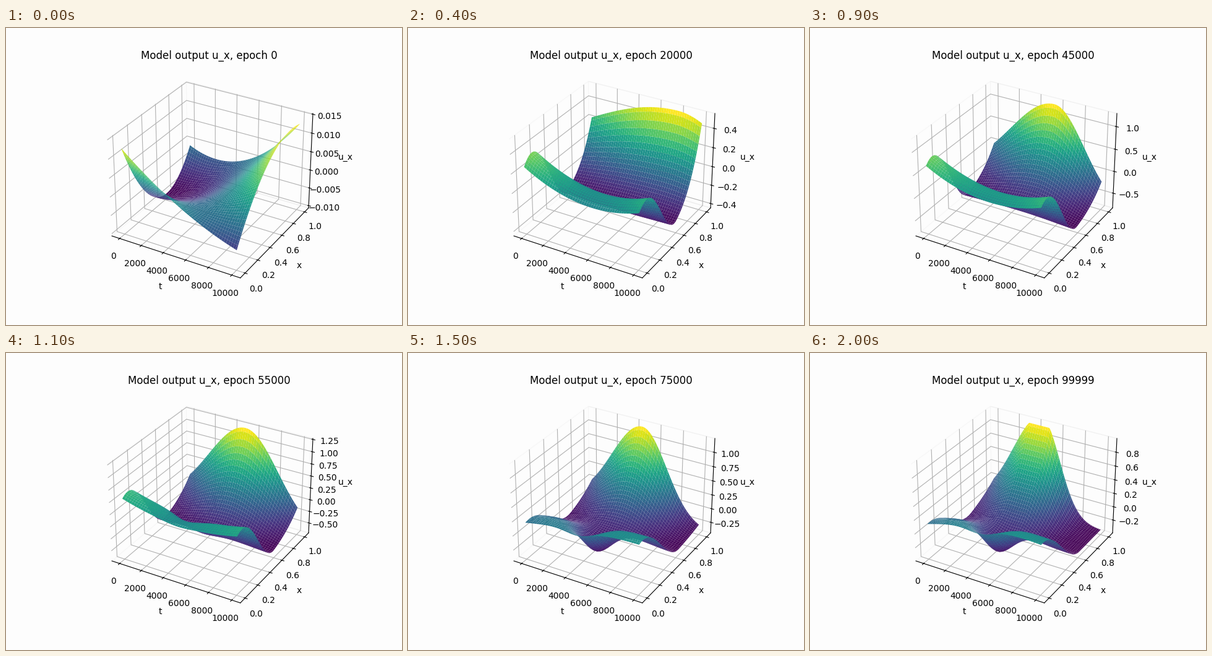
Write a matplotlib script that moves like this. It is 640 by 480 pixels and loops after 2.1 s.

```python
import numpy as np
import matplotlib.pyplot as plt
from matplotlib.animation import FuncAnimation

FRAMES, STEP_MS = 21, 100
BG = "#fdfdfd"
BASE = 0.03                              # relative height of the valley floor
KEYS = [.1, .3, .45, .65, .75, 1]        # training progress at the key points

s = np.linspace(0, 1, 100)
t, x = np.meshgrid(s, s, indexing="ij")


def track(p, *values):
    return np.interp(p, KEYS, values)


def ease(p, start, end):
    u = np.clip((p - start) / (end - start), 0, 1)
    return u * u * (3 - 2 * u)


def untrained():
    """Saddle that the network puts out before training."""
    return ((.907 - 1.04 * t + .33 * t**2)
            + (-2.8 + 4.02 * t + .56 * t**2) * x
            + (2.26 - 3.57 * t + .26 * t**2) * x**2)


def trained(p):
    """Ridge along x = 0, valley, and a wall that narrows to a peak at x = 1."""
    late = ease(p, .45, .75)

    left = track(p, .69, .85, .745, .54, .36, .34)
    right = track(p, .53, .73, .66, .55, .50, .49)
    sag = track(p, .09, .25, .155, .03, -.03, -.06)
    ridge = left + (right - left) * t - 4 * sag * t * (1 - t)
    phase = np.clip((x - .13 + .1 * p) / (.5 + .1 * late), -1, 1)
    front = ridge * (1 + np.cos(np.pi * phase)) / 2

    peak = .43 + .8 * np.exp(-p / .25)
    rise = .36 + 2.9 * np.exp(-p / .17)
    fall = track(p, 1, .57, .385, .45, .32, .24)
    bell = np.exp(-((t - peak) / np.where(t < peak, rise, fall))**2)
    bell = np.minimum(bell * (1 + .1 * ease(p, .75, 1)), 1)
    wall = (1 - BASE) * bell * x**(5.2 - 2.4 * p)

    notch = .3 * late * np.exp(-((t - .48) / .16)**2 - ((x - .25) / .2)**2)
    return BASE + front + wall - notch


def limits(p):
    """Range of u_x."""
    lo = track(p, -.268, -.587, -.80, -.552, -.41, -.368)
    hi = track(p, .421, .645, 1.243, 1.2175, 1.205, .968)
    start = min(p / KEYS[0], 1)
    return -.0101 + (lo + .0101) * start, .0147 + (hi - .0147) * start


def output(p):
    w = 1 - (1 - min(p / KEYS[0], 1))**3
    lo, hi = limits(p)
    shape = (1 - w) * untrained() + w * trained(max(p, KEYS[0]))
    return lo + (hi - lo) * shape


def padded(lo, hi):
    pad = (hi - lo) / 48
    return lo - pad, hi + pad


fig = plt.figure(figsize=(6.4, 4.8), dpi=100, facecolor=BG)
ax = fig.add_subplot(projection="3d")
ax.set_facecolor("none")
for axis in (ax.xaxis, ax.yaxis, ax.zaxis):
    axis.pane.set_fill(False)
ax.set_xlabel("t")
ax.set_ylabel("x")
ax.set_zlabel("u_x")
sheet = None


def draw(i):
    global sheet
    if sheet is not None:
        sheet.remove()
    epoch = min(i * 5000, 99999)
    p = epoch / 1e5
    sheet = ax.plot_surface(t * 10000, x, output(p), cmap="viridis")
    ax.set_xlim(*padded(-500, 10500))
    ax.set_ylim(*padded(-0.05, 1.05))
    ax.set_zlim(*padded(*limits(p)))
    ax.set_title(f"Model output u_x, epoch {epoch}")
    return (sheet,)


anim = FuncAnimation(fig, draw, frames=FRAMES, interval=STEP_MS,
                     repeat=True, repeat_delay=0, blit=False)
plt.show()
```
